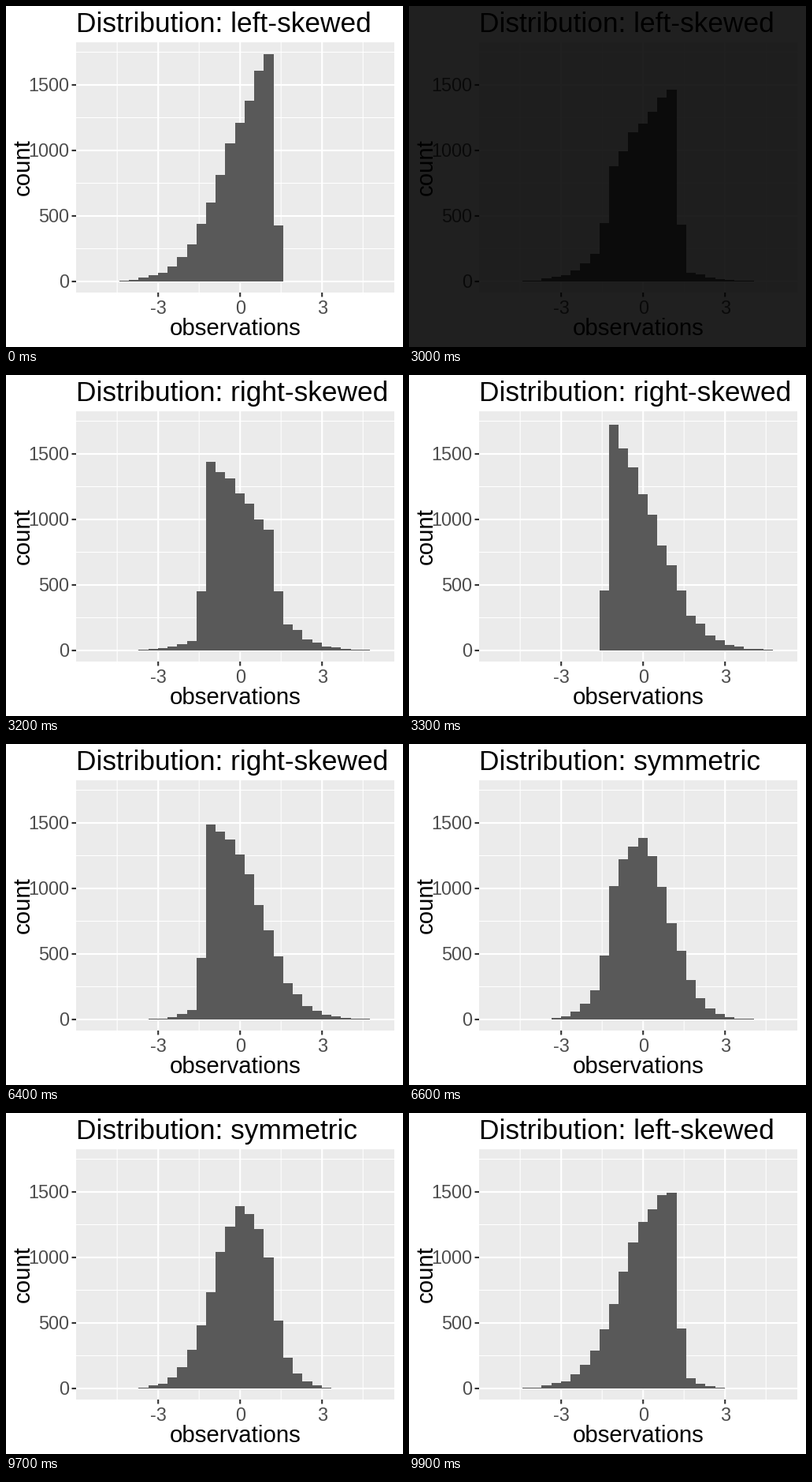
Animation, 504 px wide and 432 px high, one loop 10 s. Source, as a matplotlib script:

```python
import numpy as np
import matplotlib.pyplot as plt
from matplotlib.animation import FuncAnimation
from matplotlib.patches import Rectangle

W, H, DPI = 504, 432, 72
LEFT, RIGHT, TOP, BOTTOM = 89, 493, 46, 363   # panel edges in pixels
X0, X_UNIT = 297.2, 34.67
Y0, Y_UNIT = 349, 0.166
BIN_START, BIN_W, BINS = 107.12, 12.24, 30

plt.rcParams["font.family"] = "Liberation Sans"


def counts(first, *values):
    """Bin counts with the listed values starting at bin `first`."""
    out = np.zeros(BINS)
    out[first:first + len(values)] = values
    return out


STATES = {
    "left-skewed": counts(3, 5, 12, 30, 48, 66, 115, 187, 283, 440, 602, 813,
                          1054, 1211, 1380, 1608, 1735, 428),
    "right-skewed": counts(11, 458, 1722, 1542, 1398, 1193, 1036, 801, 651,
                           458, 265, 205, 114, 78, 42, 30, 14, 10, 7),
    "symmetric": counts(6, 14, 30, 78, 157, 301, 494, 783, 1120, 1295, 1452,
                        1319, 1084, 759, 548, 313, 151, 72, 30, 8),
}
NAMES = list(STATES)
STARTS = (30, 64, 97)   # frames at which each state begins to morph
STEPS = 4
FRAMES, INTERVAL = 100, 100
DIM_FRAME = 30

fig = plt.figure(figsize=(W / DPI, H / DPI), dpi=DPI, facecolor="white")
ax = fig.add_axes([0, 0, 1, 1])
ax.set(xlim=(0, W), ylim=(H, 0))
ax.axis("off")


def px(x):
    return X0 + x * X_UNIT


def py(y):
    return Y0 - y * Y_UNIT


def line(xs, ys, width, color="white", z=1):
    ax.plot(xs, ys, color=color, lw=width, solid_capstyle="butt",
            snap=False, zorder=z)


def label(x, y, text, size, color="black", ha="center", rotation=0):
    return ax.text(x, y, text, size=size, color=color, ha=ha, va="baseline",
                   rotation=rotation, rotation_mode="anchor", zorder=4)


ax.add_patch(Rectangle((LEFT, TOP), RIGHT - LEFT, BOTTOM - TOP,
                       fc="#EBEBEB", lw=0, zorder=0))

# Minor grid, then major grid with ticks and labels
for x in (-4.5, -1.5, 1.5, 4.5):
    line([px(x)] * 2, [TOP, BOTTOM], 1.07)
for y in (250, 750, 1250, 1750):
    line([LEFT, RIGHT], [py(y)] * 2, 1.07)
for x in (-3, 0, 3):
    line([px(x)] * 2, [TOP, BOTTOM], 2.13, z=2)
    line([px(x)] * 2, [BOTTOM, BOTTOM + 5.5], 2.13, "#333333")
    label(px(x), 390, str(x), 23.47, "#4D4D4D")
for y in (0, 500, 1000, 1500):
    line([LEFT, RIGHT], [py(y)] * 2, 2.13, z=2)
    line([LEFT - 5.5, LEFT], [py(y)] * 2, 2.13, "#333333")
    label(80.5, py(y) + 8, str(y), 23.47, "#4D4D4D", ha="right")

label((LEFT + RIGHT) / 2, 417, "observations", 29.33)
label(30, (TOP + BOTTOM) / 2, "count", 29.33, rotation=90)
title = label(LEFT, 33, "", 35.2, ha="left")

edges = np.round(BIN_START + BIN_W * np.arange(BINS + 1))
bars = ax.bar(edges[:-1], np.zeros(BINS), np.diff(edges), bottom=Y0,
              align="edge", color="#595959", lw=0, antialiased=False,
              snap=True, zorder=3)
ax.set(xlim=(0, W), ylim=(H, 0))

dim = ax.add_patch(Rectangle((0, 0), W, H, fc="black", lw=0, alpha=0.875,
                             zorder=10))


def blend(frame):
    """Current title and bin counts."""
    name, values = NAMES[0], STATES[NAMES[0]]
    for i, start in enumerate(STARTS):
        if frame < start:
            break
        w = min((frame - start + 1) / STEPS, 1)
        a, b = NAMES[i], NAMES[(i + 1) % len(NAMES)]
        name = b if w > 0.5 else a
        values = (1 - w) * STATES[a] + w * STATES[b]
    return name, values


def update(frame):
    name, values = blend(frame)
    title.set_text(f"Distribution: {name}")
    for bar, h in zip(bars, np.round(values * Y_UNIT)):
        bar.set_height(-h)
        bar.set_visible(h > 0)
    dim.set_visible(frame == DIM_FRAME)
    return [title, dim, *bars]


anim = FuncAnimation(fig, update, frames=FRAMES, interval=INTERVAL,
                     repeat=True, repeat_delay=0, blit=False)
plt.show()
```
